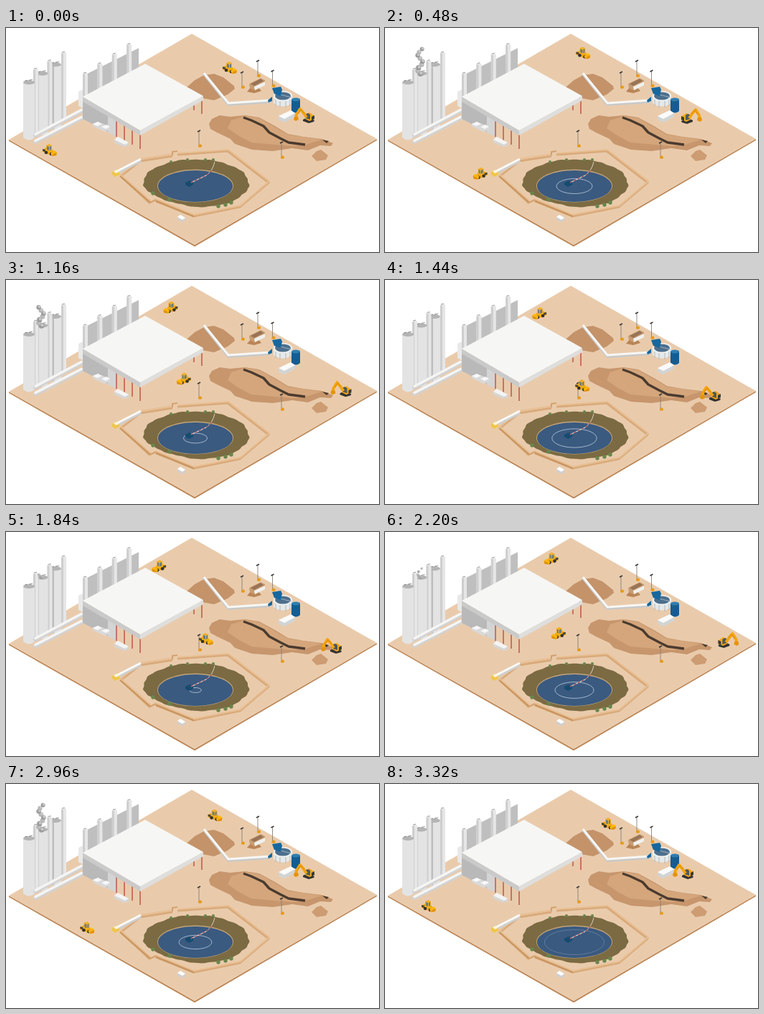
Recreate the animation shown at these times as an HTML page. Size 520 by 313 pixels, loop 3.36 s.

```html
<!DOCTYPE html>
<html lang="en">
<head>
<meta charset="utf-8">
<title>Quarry plant</title>
<style>
html, body { margin: 0; width: 100%; height: 100%; overflow: hidden; background: #fff }
svg { display: block; width: 520px; height: 313px }
</style>
</head>
<body>
<svg viewBox="0 0 520 313">
<defs>
  <g id="lamp">
    <path d="M0 0V20" stroke="#8b8177" stroke-width=".9"/>
    <path d="M-2 0L2 -2" stroke="#333" stroke-width="1.4"/>
    <path d="M-1 19l3-2 2 2v2l-3 1-2-1z" fill="#e69b1c"/>
  </g>
  <g id="loader">
    <path d="M-10 0L-5-3 4 0 6 4-1 7-10 3z" fill="#f5a90b"/>
    <path d="M-10-1L-6 0V3L-10 2z" fill="#4a4437"/>
    <path d="M-5-6L-1-8 3-6V1L-1 3-5 1z" fill="#f0b02c"/>
    <path d="M-4-5L-1-4V1L-4 0zM0-4L2-5V0L0 1z" fill="#6c7c78"/>
    <circle cx="-5" cy="4" r="2.3" fill="#333"/><circle cx="2" cy="6" r="2.3" fill="#333"/>
    <path d="M1 5L7 1 10 4 9 8 3 9z" fill="#ffb510"/>
    <path d="M3 9L5 6 10 4 9 8z" fill="#df910a"/>
  </g>
  <g id="digger">
    <path d="M-8 3L-2 0 8 4 7 6 0 8-8 5z" fill="#343331"/>
    <path d="M-5-4L1-7 7-3 8 2 1 5-5 2z" fill="#f4a71c"/>
    <path d="M-4-5L-1-6 2-4V3L-4 1z" fill="#4d5a5a"/>
    <path d="M4-1L8-3V2L4 4z" fill="#3b3933"/>
    <path d="M-3 0L-7-6-12-12-17-4-18 1" fill="none" stroke="#f5a40f" stroke-width="4" stroke-linejoin="round"/>
    <path d="M-6-6L-11-11-15-5" fill="none" stroke="#c98010" stroke-width=".8"/>
    <path d="M-20-1L-15-1-14 3-18 5-21 3z" fill="#e4930c"/>
  </g>
</defs>

<path d="M4 156L263 303 517 155V157L263 305.500 4 158z" fill="#bd8757"/>
<path d="M259 8L517 155 263 303 4 156z" fill="#e9cbac"/>

<!-- stockpiles -->
<path d="M247 87L263 73 276 66 290 64 303 69 318 81 319 85 309 93 290 101 268 97z" fill="#c4936a"/>
<path d="M283 134L287 127 298 122 312 124 333 122 353 125 375 137 393 148 415 152 440 155 456 161 453 165 438 164 421 171 399 168 372 172 343 170 319 162 313 155 294 146 285 141z" fill="#c7966d"/>
<path d="M309 140L314 129 333 123 353 126 393 149 440 156 418 163 399 165 365 162 342 160 325 151z" fill="#d5a67c"/>
<path d="M331 125L342 129 359 137 367 146 382 154 394 160 417 163" fill="none" stroke="#4a3b2f" stroke-width="3.400" stroke-linejoin="round"/>
<path d="M441 156L450 158 447 161z" fill="#4a3b2f"/>
<path d="M426 179L433 172 439 170 449 178 446 184 433 186z" fill="#cd9c72"/>

<!-- factory -->
<g id="silos"></g>
<path d="M107 67L185 28V58L107 98z" fill="#bfbfbf"/>
<path d="M101 89L107 86V112L101 109z" fill="#e8e8e8"/>
<g id="stacks"></g>
<g stroke-linecap="round">
  <path d="M41 150L105 116M41 159L105 126" stroke="#d2d2d2" stroke-width="6"/>
  <path d="M41 148.500L105 114.500M41 157.500L105 124.500" stroke="#f5f5f4" stroke-width="3.600"/>
</g>
<path d="M107 98L155 124V152L107 127z" fill="#b9b9b9"/>
<path d="M142 122L155 128V152L142 146z" fill="#d4d4d4"/>
<path d="M154 130V152M165 136V157M176 142V163M187 148V169M262 104V115M273 98V120" stroke="#b9443b" stroke-width="1.300"/>
<path d="M107 96L187 143V150L107 103z" fill="#cacaca"/>
<path d="M275 95V101L187 150V143z" fill="#dededd"/>
<path d="M107 96L194 50 275 95 187 143z" fill="#f6f7f5"/>
<path d="M121 134L128 131 145 138V142L137 145 121 137z" fill="#d9d9d9"/>
<path d="M121 134L128 131 134 134 127 137zM133 138L140 135 145 138 139 141z" fill="#f7f7f7"/>
<path d="M151 156L156 152 171 160V164L165 166 151 160z" fill="#d6d6d6"/>
<path d="M151 156L156 152 171 160 166 163z" fill="#f4f4f3"/>

<!-- processing line -->
<path d="M276 64L310 107 368 103" fill="none" stroke="#c9c9c7" stroke-width="4"/>
<path d="M276 63L310 105 368 101" fill="none" stroke="#f7f7f5" stroke-width="3"/>
<path d="M336 89L342 82 351 82 356 88 346 91z" fill="#b98557"/>
<path d="M339 78L355 70 361 73V79L346 87 340 84z" fill="#c79c72"/>
<path d="M346 82L361 75V80L347 87z" fill="#f1f1ee"/>
<path d="M341 78L355 71 359 74 346 81z" fill="#987456"/>
<path d="M373 95V105Q386 114 399 105V95z" fill="#e6e9ea"/>
<path d="M376 100V109M382 102V111M390 102V111M396 100V109" stroke="#b4b8ba"/>
<ellipse cx="386" cy="95" rx="13" ry="7" fill="#f3f5f5"/>
<ellipse cx="386" cy="95" rx="11" ry="5.500" fill="#4d6f8c"/>
<path d="M374 91L398 97" stroke="#9db2be"/>
<path d="M365 101L371 96V102L366 104zM371 84L383 82 385 86 383 95 374 92z" fill="#17679d"/>
<path d="M398 100V116Q404 121 410 116V100z" fill="#145d92"/>
<ellipse cx="404" cy="100" rx="6" ry="2.500" fill="#2f7eaf"/>
<path d="M380 123L397 115 403 119V124L388 132 380 128z" fill="#d1d4d5"/>
<path d="M380 123L397 115 403 119 388 127z" fill="#fafafa"/>

<!-- pond -->
<g fill="none" stroke-linejoin="round">
  <path d="M239 177L309 172 366 216 326 250 262 263 209 242M201 245L160 207 187 186 232 179" stroke="#d9aa7a" stroke-width="3.200"/>
  <path d="M160 207L201 243M209 241L262 263" stroke="#c9955f" stroke-width="3"/>
  <path d="M239 175L310 170 367 214 327 248 262 261 209 239M202 242L160 205 187 183 232 176" stroke="#e8bf94" stroke-width="2"/>
  <path d="M232 178V173L239 172M201 244L209 240" stroke="#d4a06b" stroke-width="2"/>
</g>
<polygon id="bank" fill="#7b6a42"/>
<ellipse cx="264" cy="220.500" rx="53" ry="23" fill="#c3a47a"/>
<ellipse cx="264" cy="221" rx="52" ry="22" fill="#3a5a80"/>
<ellipse id="ripple" cx="264" cy="221" fill="none" stroke="#c3d0df" stroke-width=".9"/>
<path d="M250 216L256 213 261 216V219L255 222 250 219z" fill="#164c70"/>
<path d="M279 206Q288 200 291 187" fill="none" stroke="#d8cdc2"/>
<path d="M258 216L279 206" stroke="#e6ded9" stroke-width="1.300"/>
<path d="M258 216L279 206Q284 203 287 198" fill="none" stroke="#bd4b4b" stroke-width="1.200" stroke-dasharray="3 3"/>
<g id="bushes"></g>
<path d="M153 203L188 185" stroke="#cfcfcd" stroke-width="5"/>
<path d="M153 201L188 183" stroke="#fafaf8" stroke-width="3"/>
<path d="M148 201L154 198 158 201V205L152 208 148 205z" fill="#f0c64a"/>
<path d="M150 200L155 198 158 201 153 203z" fill="#fbf6df"/>
<path d="M239 264L243 261 250 265V269L246 271 239 268z" fill="#cfcfcf"/>
<path d="M239 264L243 261 250 265 246 268z" fill="#fff"/>

<g id="lamps"></g>
<g id="smoke"></g>
<use id="far" href="#loader"/>
<use id="near" href="#loader"/>
<use id="arm" href="#digger"/>
</svg>
<script>
const LOOP = 3360, STEP = 40, CYCLE = 840, TURN = 1660;
const $ = id => document.getElementById(id);
const range = n => [...Array(n).keys()];
const fill = (id, items, shape) => $(id).innerHTML = items.map(shape).join('');

const tower = (x, top, bottom) =>
  `<path d="M${x} ${top}l4-2 3 2V${bottom - 4}L${x} ${bottom}z" fill="#e6e6e6"/>
   <path d="M${x} ${top}l3 1V${bottom - 2}L${x} ${bottom}z" fill="#cecece"/>
   <path d="M${x + 1} ${top - 1}l4-1" stroke="#777" stroke-width=".7"/>`;
const silo = (x, top, bottom, shade) =>
  `<path d="M${x} ${top}V${bottom}q8 7 16 0V${top}z" fill="#e3e3e3"/>
   <path d="M${x} ${top}h${shade}V${bottom + 3}l${-shade}-3z" fill="#bdbdbd"/>
   <ellipse cx="${x + 8}" cy="${top}" rx="8" ry="3" fill="#b4b4b4"/>
   <path d="M${x + 2} ${top - 2}l4-1m2 0l5-1" stroke="#777" stroke-width=".8"/>`;

fill('silos', range(3), i =>
  tower(77 - 19.5 * i, 35 + 11.5 * i, 131 + 11 * i) + silo(61 - 18.5 * i, 51 + 12.5 * i, 139 + 7 * i, 6 - 3 * i));
fill('stacks', range(4), i => tower(107 + 20.4 * i, 64 - 13.5 * i, 98 - 10 * i));
fill('lamps', [[329, 63], [351, 47], [371.5, 61], [269, 145], [384, 161]], ([x, y]) =>
  `<use href="#lamp" x="${x}" y="${y}"/>`);
fill('bushes', [[230, 187], [253, 184], [278, 184], [289, 184], [205, 231],
  [228, 240], [296, 249], [306, 247], [314, 244]], ([x, y]) =>
  `<circle cx="${x}" cy="${y}" r="${y < 200 ? 2 : 2.7}" fill="#68864b"/>`);

// Ragged bank, pressed in at the lower left
$('bank').setAttribute('points', range(90).map(i => {
  const a = i * Math.PI / 45;
  const dent = .12 * Math.max(0, Math.cos(a - 2.2)) ** 4;
  const k = 1 + .012 * Math.sin(9 * a) + .01 * Math.sin(23 * a) - dent;
  return [264.5 + 74 * k * Math.cos(a), 217.5 + 34 * k * Math.sin(a)].map(v => v.toFixed(1));
}).join(' '));

// Routes as [time, x, y]; each is driven out and then back in reverse
const nearRoute = [[0, 61, 170], [440, 125, 207], [840, 201, 164], [1190, 252, 135], [1480, 279, 149]];
const farRoute = [[200, 312, 55], [640, 256, 22.5], [1560, 209, 49.5]];
const armRoute = [[360, 422, 125], [480, 421, 126], [840, 457, 146], [1150, 474, 155], [1440, 460, 162]];

function along(route, t) {
  const next = route.findIndex(key => key[0] > t);
  if (next < 1) return route.at(next).slice(1);
  const [t0, x0, y0] = route[next - 1], [t1, x1, y1] = route[next];
  const k = (t - t0) / (t1 - t0);
  return [x0 + (x1 - x0) * k, y0 + (y1 - y0) * k];
}

function drive(id, route, t, flipFrom, flipTo) {
  const [x, y] = along(route, t), side = t > flipFrom && t < flipTo ? -1 : 1;
  $(id).setAttribute('transform', `translate(${x.toFixed(1)} ${y.toFixed(1)}) scale(${side} 1)`);
}

function drawSmoke(phase) {
  const size = phase < 160 || phase >= 560 ? 0 : phase >= 520 ? .4 : Math.min(1, (phase - 120) / 280);
  fill('smoke', range(Math.ceil(9 * size)), i => {
    const x = 49 + 3.5 * Math.sin(i * 1.3 + 3), y = 64 - 4.3 * i, r = (size < .5 ? 2 : 3.8) - .1 * i;
    return `<circle cx="${x}" cy="${y}" r="${r}" fill="${i % 2 ? '#b5b5b5' : '#9c9c9c'}"/>
      <circle cx="${x + 1}" cy="${y - 1}" r="${r * .55}" fill="#c9c9c9"/>`;
  });
}

function draw(t) {
  const u = Math.max(0, TURN - Math.abs(TURN - t));
  drive('near', nearRoute, u, 440, 1190);
  drive('far', farRoute, u, 640, LOOP);
  drive('arm', armRoute, u, 370, 1150);

  const phase = t % CYCLE, r = phase * .052;
  $('ripple').setAttribute('rx', r);
  $('ripple').setAttribute('ry', r * .42);
  $('ripple').setAttribute('opacity', Math.min(.85, (900 - phase) / 320));
  drawSmoke(phase);
}

const start = performance.now();
function tick(now) {
  draw(Math.floor(Math.max(0, now - start) % LOOP / STEP) * STEP);
  requestAnimationFrame(tick);
}
tick(start);
</script>
</body>
</html>
```
